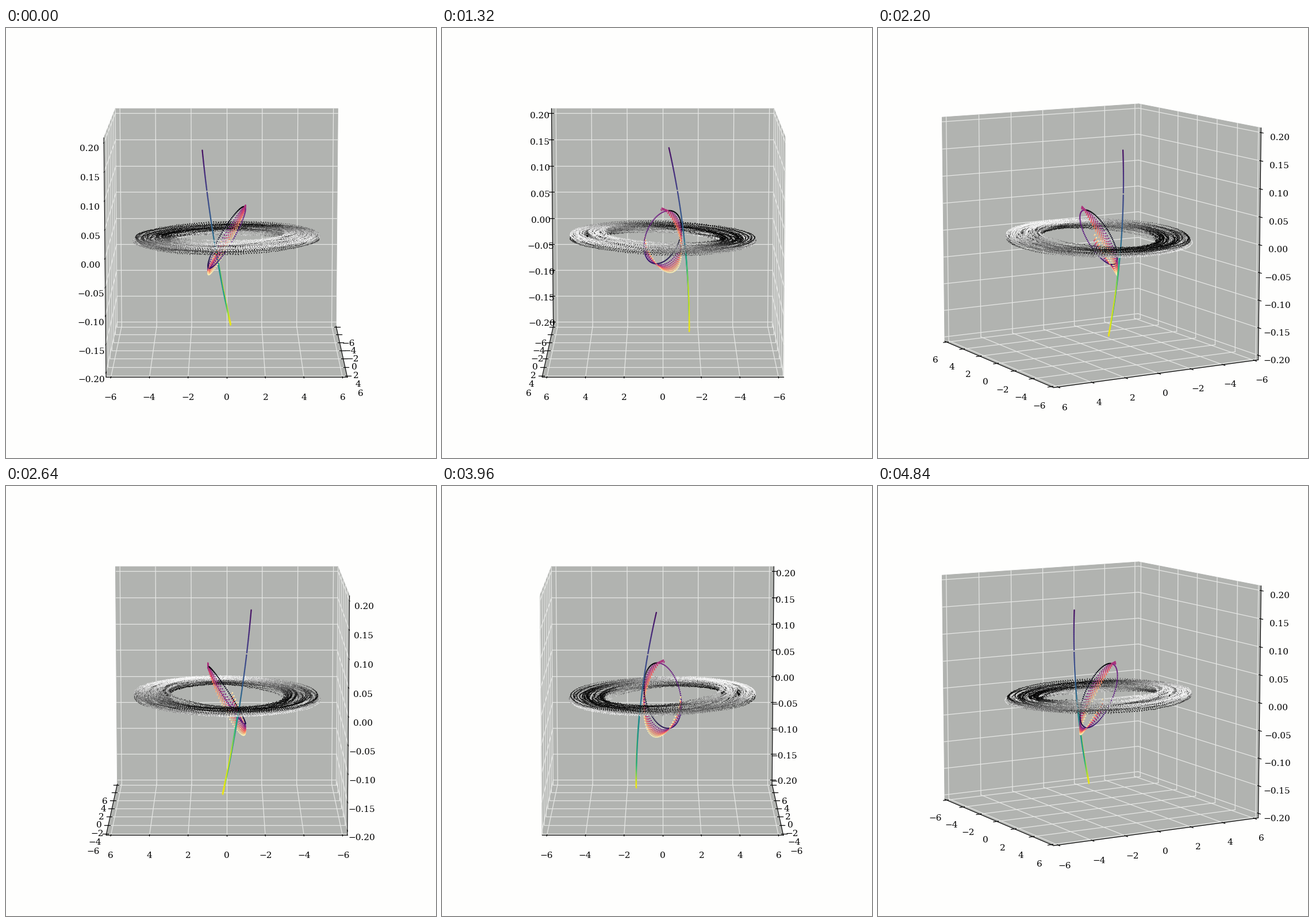
Animation of 748 by 748 pixels, one loop 5280 ms. Source, as a matplotlib script:

```python
import numpy as np
import matplotlib.pyplot as plt
from matplotlib.animation import FuncAnimation
from matplotlib.collections import LineCollection, PolyCollection

SIZE, DPI = 748, 100
FRAMES, INTERVAL = 12, 440
ELEV = np.radians(10)
SCALE, CX, CY, DIST = 4026, 383.9, 364.3, 10
PAPER, PANE, GRID = "#fefefd", "#b1b3b0", "#e6e7e5"
LABEL_GAP, LABEL_DROP = 0.056, 11.6
TICK_OUT, TICK_IN = 0.016, 0.008

FLAT = [(v / 12.5, str(v).replace("-", "\u2212")) for v in range(-6, 7, 2)]
TALL = [(k * 0.12, f"{k * 0.05:.2f}".replace("-", "\u2212"))
        for k in range(-4, 5)]
TICKS = [FLAT, FLAT, TALL]

rng = np.random.default_rng(7)


def project(points, azim):
    """Perspective view of points in a unit cube: pixel positions and depth."""
    x, y, z = np.asarray(points, float).T
    toward = x * np.cos(azim) + y * np.sin(azim)
    right = y * np.cos(azim) - x * np.sin(azim)
    up = z * np.cos(ELEV) - toward * np.sin(ELEV)
    depth = DIST - toward * np.cos(ELEV) - z * np.sin(ELEV)
    pixels = np.column_stack([CX + SCALE * right / depth,
                              CY - SCALE * up / depth])
    return pixels, depth


def make_disc(strands=54, count=220):
    """Warped ring of slightly inclined, eccentric orbits."""
    tilt_dir = np.radians(30)
    inner, outer = 0.25, 0.401
    parts, shades = [], []
    for a in np.linspace(inner, outer, strands):
        node, peri, start = rng.uniform(0, 2 * np.pi, 3)
        th = start + np.linspace(0, 2 * np.pi, count, endpoint=False)
        fringe = 0.006 * np.exp((inner - a) / 0.01) * np.sin(58 * th)
        r = a + fringe + 0.003 * np.cos(th - peri)
        r += rng.normal(0, 0.0006, count)
        wave = np.sin(th - node) + rng.normal(0, 0.08, count)
        warp = np.interp(a, [inner, outer], [0.022, 0.009])
        spread = np.interp(a, [inner, outer], [0.018, 0.011])
        facing = np.cos(th - tilt_dir)
        z = warp * facing + spread * wave
        shade = 0.43 + 0.62 * facing * np.clip(0.35 + 1.3 * wave, -1, 1)
        shade += rng.normal(0, 0.1, count)
        parts.append(np.column_stack([r * np.cos(th), r * np.sin(th), z]))
        shades.append(np.clip(shade, 0.02, 0.98))
    return np.vstack(parts), plt.cm.gray(np.concatenate(shades))


def orbit(phi, u):
    """Tilted inner orbit; u runs from the first (0) to the last (1)."""
    peak = np.radians(108 - 39 * u ** 0.6)
    z = (0.13 + 0.03 * u) * np.cos(phi - peak) - 0.009 * u
    return np.column_stack([0.081 * np.cos(phi), 0.081 * np.sin(phi), z])


def make_orbits(strands=8):
    p = np.linspace(0, 1, 105)
    parts = [orbit(np.radians(110 + 350 * p), 0)]
    shades = [0.36 * p ** 1.2]
    for k in range(1, strands):
        u = k / (strands - 1)
        phi = np.linspace(82 + 8 * u, 340, 52) + 5 * (k * 0.618 % 1)
        mix = np.clip((phi - 90) / 80, 0, 1)
        parts.append(orbit(np.radians(phi), u))
        shades.append(0.47 * (1 - mix) + (0.24 + 0.73 * u) * mix)
    return np.vstack(parts), plt.cm.magma(np.concatenate(shades))


def make_streak():
    """Steep bowed path; a second pass overlaps its lower half."""
    knots = [0.376, 0, -0.412]
    x_of = np.polyfit(knots, [-0.027, -0.0916, -0.115], 2)
    y_of = np.polyfit(knots, [-0.105, -0.0595, 0.0165], 2)

    def path(z, levels, shades, shift):
        xyz = np.column_stack([np.polyval(x_of, z) + shift * np.cos(1.9),
                               np.polyval(y_of, z) + shift * np.sin(1.9), z])
        return xyz, plt.cm.viridis(np.interp(-z, levels, shades))

    z = np.linspace(0.376, -0.412, 230)
    z = z[(z < 0.18) | (z > 0.205) | (np.arange(z.size) % 5 < 3)]
    down = path(z, [-0.376, -0.19, 0, 0.1, 0.29, 0.34, 0.39],
                [0.04, 0.2, 0.34, 0.46, 0.57, 0.76, 0.96], 0)
    back = path(np.linspace(-0.06, -0.408, 100), [0.06, 0.15, 0.23, 0.41],
                [0.52, 0.72, 0.91, 0.97], 0.0025)
    return [np.vstack(pair) for pair in zip(down, back)]


groups = [make_disc(), make_orbits(), make_streak()]
points = np.vstack([g[0] for g in groups])
colors = np.vstack([g[1] for g in groups])
sizes = np.repeat([1.2, 2.9, 2.9], [len(g[0]) for g in groups])

fig = plt.figure(figsize=(SIZE / DPI, SIZE / DPI), dpi=DPI, facecolor=PAPER)
ax = fig.add_axes([0, 0, 1, 1])


def add_lines(pairs, azim, color, width, order):
    flat = project(np.reshape(pairs, (-1, 3)), azim)[0]
    ax.add_collection(LineCollection(flat.reshape(-1, 2, 2), colors=color,
                                     linewidths=width, zorder=order,
                                     capstyle="projecting"), autolim=False)


def draw_panes(azim, walls):
    quads, lines = [], []
    for d in range(3):
        a, b = [k for k in range(3) if k != d]
        quad = np.full((4, 3), walls[d])
        quad[:, a] = [-0.5, 0.5, 0.5, -0.5]
        quad[:, b] = [-0.5, -0.5, 0.5, 0.5]
        quads.append(project(quad, azim)[0])
        for along, across in ((a, b), (b, a)):
            for value, _ in TICKS[along]:
                line = np.full((2, 3), walls[d])
                line[:, along] = value
                line[:, across] = [-0.5, 0.5]
                lines.append(line)
    ax.add_collection(PolyCollection(quads, facecolors=PANE, edgecolors=PANE,
                                     linewidths=0.7, zorder=1), autolim=False)
    add_lines(lines, azim, GRID, 0.9, 2)


def draw_axis(azim, axis, edge, tick_dim):
    """Axis line, ticks and labels on the cube edge given by its signs."""
    edge = np.array(edge, float)
    spine = np.tile(edge / 2, (2, 1))
    spine[:, axis] = [-0.5, 0.5]
    ticks, spots = [], []
    for value, _ in TICKS[axis]:
        tick = np.tile(edge / 2, (2, 1))
        tick[:, axis] = value
        tick[:, tick_dim] += edge[tick_dim] * np.array([TICK_OUT, -TICK_IN])
        ticks.append(tick)
        spot = edge * (0.5 + LABEL_GAP)
        spot[axis] = value
        spots.append(spot)
    add_lines([spine], azim, "black", 0.8, 3)
    add_lines(ticks, azim, "black", 0.9, 3)
    for (x, y), (_, text) in zip(project(spots, azim)[0], TICKS[axis]):
        ax.text(x, y + LABEL_DROP, text, ha="center", va="baseline",
                family="DejaVu Serif", fontsize=11, color="black", zorder=4)


def draw(i):
    ax.clear()
    ax.set(xlim=(0, SIZE), ylim=(SIZE, 0))
    ax.axis("off")
    azim = np.radians(30 * i)
    sx = 1 if np.cos(azim) > -1e-9 else -1
    sy = 1 if np.sin(azim) > -1e-9 else -1

    draw_panes(azim, [-sx / 2, -sy / 2, -0.5])
    draw_axis(azim, 0, (0, sy, -1), 1)
    draw_axis(azim, 1, (sx, 0, -1), 0)
    draw_axis(azim, 2, (sx, -sy, 0), 0)

    pixels, depth = project(points, azim)
    order = np.argsort(-depth)
    ax.scatter(*pixels[order].T, s=sizes[order], c=colors[order],
               linewidths=0, zorder=5)
    return ax.get_children()


anim = FuncAnimation(fig, draw, frames=FRAMES, interval=INTERVAL,
                     repeat=True, repeat_delay=0, blit=False)
plt.show()
```
